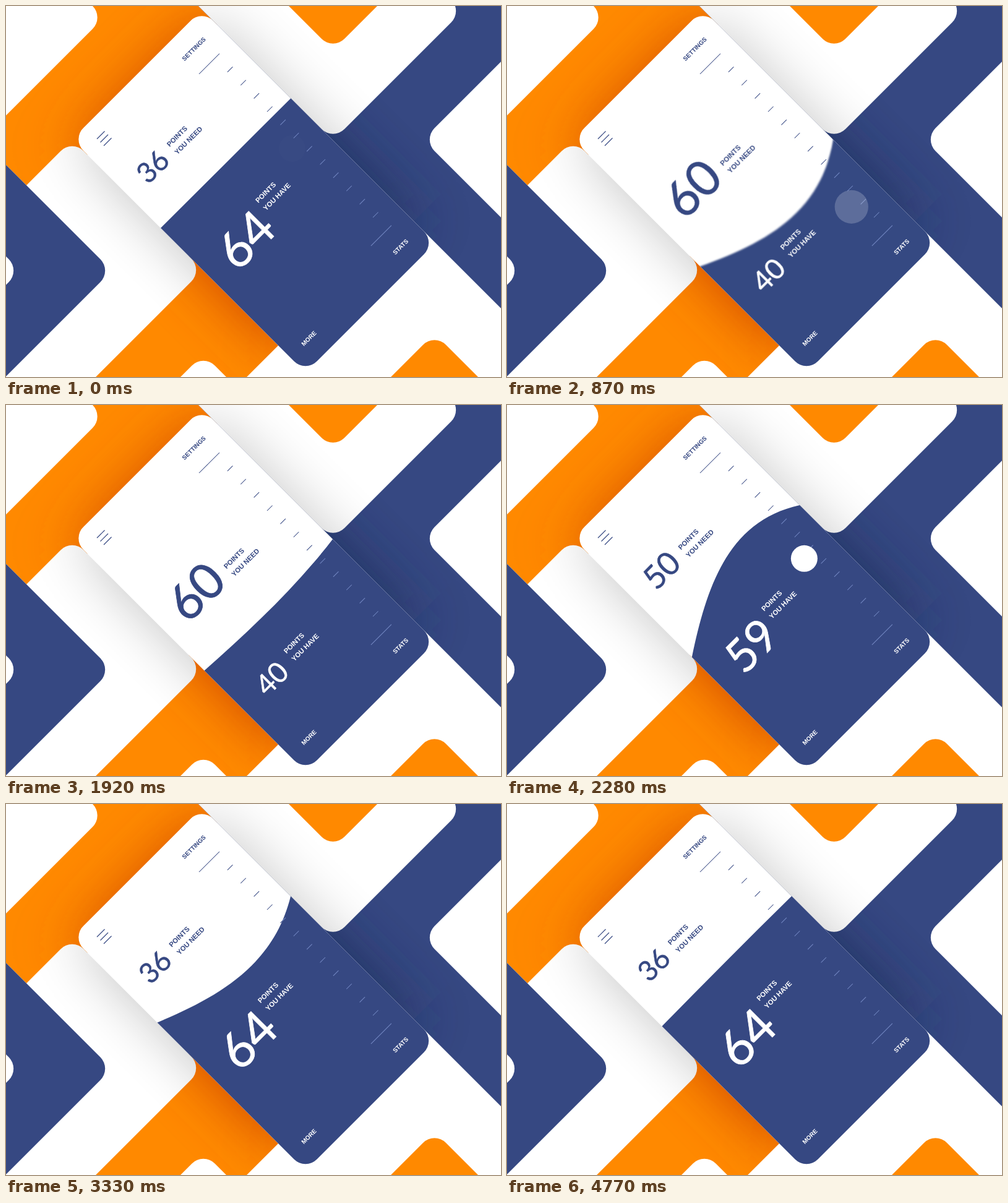
Write an HTML page that moves like this. It is 800 by 600 pixels and loops after 4800 ms.

```html
<!DOCTYPE html>
<html lang="en">
<head>
<meta charset="utf-8">
<title>Points</title>
<style>
  html, body { margin: 0; width: 100%; height: 100%; overflow: hidden; background: #fff; }
  svg { display: block; width: 800px; height: 600px; }
  text { font: 700 15.8px "Liberation Sans", Arial, sans-serif; }
  .small { font-size: 14px; }
  .num { font-family: Lato, sans-serif; font-weight: 400; stroke-width: .01em; }
  .dark { fill: #364882; }
  .light { fill: #fff; }
  .num.dark { stroke: #364882; }
  .num.light { stroke: #fff; }
</style>
</head>
<body>
<svg id="stage" viewBox="0 0 800 600"></svg>
<script>
const LOOP = 4800;
const NAVY = '#364882', ORANGE = '#ff8900', WHITE = '#fff';
const RADIUS = 37, FAR = 1900;
const LEFT = -109, RIGHT = 311, TOP = 322, BOTTOM = 1077;

// Tilted axes: p = x - y runs along the text, q = x + y runs down the card.
const TILT = 'matrix(.5 -.5 .5 .5 0 0)';

const rect = (p0, q0, p1, q1, r, attrs = '') =>
  `<rect x="${p0}" y="${q0}" width="${p1 - p0}" height="${q1 - q0}" rx="${r}" ${attrs}/>`;

// A background tile; with a shade it also catches the shadow of the card.
let clips = 0;
function tile(p0, q0, p1, q1, fill, r = RADIUS, shade = '', alpha = 1) {
  const base = rect(p0, q0, p1, q1, r, `fill="${fill}"`);
  if (!shade) return base;
  const id = 'tile' + clips++;
  const shadow = rect(LEFT, TOP + 20, RIGHT, BOTTOM - 70, 0,
    `fill="${shade}" opacity="${alpha}" filter="url(#soft)"`);
  return `${base}<clipPath id="${id}">${rect(p0, q0, p1, q1, r)}</clipPath>
    <g clip-path="url(#${id})">${shadow}</g>`;
}

function ticks(color) {
  let d = '';
  for (let i = 0; i < 14; i++) d += `M${i % 13 ? 251 : 202} ${422 + 42.75 * i}H268`;
  return `<path d="${d}" stroke="${color}" stroke-width="1.4" fill="none"/>`;
}

const counter = (id, tone, word) => `<g id="${id}">
  <text class="num ${tone}"></text>
  <text class="${tone}">POINTS</text>
  <text class="${tone}">${word}</text></g>`;

const blurFilter = (id, spread) =>
  `<filter id="${id}" filterUnits="userSpaceOnUse" x="-900" y="-400" width="2200" height="2000">
    <feGaussianBlur stdDeviation="${spread}"/></filter>`;

const stage = document.getElementById('stage');
stage.innerHTML = `
  <defs>
    ${blurFilter('soft', 66)}${blurFilter('smear', 0)}${blurFilter('smudge', 0)}
    <clipPath id="card">${rect(LEFT, TOP, RIGHT, BOTTOM, RADIUS)}</clipPath>
    <clipPath id="low"><path class="wave"/></clipPath>
  </defs>
  <g transform="${TILT}">
    ${tile(-257, -FAR, RIGHT, 372, ORANGE, 0, '#cc4400')}
    ${tile(-FAR, -FAR, 140, 177, WHITE)}
    ${tile(-FAR, 700, LEFT, 989, ORANGE, 0, '#cc4400')}
    ${tile(-FAR, 882, -244, FAR, WHITE)}
    ${tile(-FAR, 323, LEFT, 745, WHITE, RADIUS, '#000', .24)}
    ${tile(-FAR, -FAR, -257, 599, NAVY)}
    ${tile(-FAR, -FAR, -405, 451, WHITE)}
    ${tile(RIGHT, -FAR, FAR, FAR, NAVY, 0, '#1f2a56', .8)}
    ${tile(RIGHT, -FAR, 730, 746, WHITE, RADIUS, '#000', .22)}
    ${tile(457, -FAR, FAR, 600, ORANGE)}
    ${tile(458, 890, FAR, FAR, WHITE)}
    ${tile(-FAR, 1222, 163, FAR, ORANGE)}
    <g clip-path="url(#card)">
      ${rect(LEFT, TOP, RIGHT, BOTTOM, 0, `fill="${WHITE}"`)}
      ${ticks(NAVY)}
      <path d="M-68 362h25m-25 11h25m-25 11h25" stroke="${NAVY}" stroke-width="1.7"/>
      <text class="small dark" x="269" y="378" text-anchor="end">SETTINGS</text>
      <path class="wave" id="pool" fill="${NAVY}"/>
      <g clip-path="url(#low)">${ticks('#7489c4')}</g>
      <text class="small light" x="-69" y="1032">MORE</text>
      <text class="small light" x="270" y="1032" text-anchor="end">STATS</text>
      ${counter('need', 'dark', 'YOU NEED')}
      ${counter('have', 'light', 'YOU HAVE')}
      <circle id="touch" cx="232" fill="${WHITE}"/>
    </g>
  </g>`;

const pick = id => document.getElementById(id);
const waves = stage.querySelectorAll('.wave');
const pool = pick('pool'), touch = pick('touch');
const need = pick('need'), have = pick('have');

const { PI, exp, sin, cos, abs, min, max } = Math;
const mix = (a, b, k) => a + (b - a) * k;
const clamp = x => min(1, max(0, x));

// One drag goes down, a second one goes back up; s is the time since a press.
const SECOND = 1950, RELEASE = 787;
const pulse = x => x * exp(1 - x);
const swing = (s, period, life) => {
  const d = max(0, s - RELEASE);
  return sin(2 * PI * d / period) * life(d);
};

const settle = s => 1 - exp(-s / 200);
const count = s => clamp(s / 780);
const lag = s => {
  const w = PI / 1420, life = 560;
  return 1 - exp(-s / life) * (cos(w * s) + sin(w * s) / (w * life));
};
const bounce = s => -20 * swing(s, 480, d => exp(-d / 700));
const bulge = s => 127 * pulse(s / 420) ** 4 + 125 * swing(s, 333, d => pulse(d / 300));

// The second drag answers with the same motion, mirrored.
const both = (f, t) => f(t) - f(max(0, t - SECOND));

function place(el, x, y) {
  el.setAttribute('x', x.toFixed(2));
  el.setAttribute('y', y.toFixed(2));
}

function setCounter(group, value, size, numX, numY, labelX, labelY) {
  const [num, first, second] = group.children;
  num.textContent = Math.round(value);
  num.style.fontSize = size.toFixed(2) + 'px';
  place(num, numX, numY);
  place(first, labelX, labelY);
  place(second, labelX, labelY + 25);
}

function setBlur(el, name, amount) {
  if (amount > .1) {
    pick(name).firstElementChild.setAttribute('stdDeviation', `0 ${amount.toFixed(2)}`);
    el.setAttribute('filter', `url(#${name})`);
  } else {
    el.removeAttribute('filter');
  }
}

function draw(t) {
  const k = both(settle, t);
  const s = t < SECOND ? t : t - SECOND;

  const a = 609 + 136 * both(lag, t), b = 609 + 136 * k, bend = both(bulge, t);
  const c1 = mix(a, b, 1 / 3) + bend * .6;
  const c2 = mix(a, b, 2 / 3) + bend;
  const d = `M-300 1300V${a}H${LEFT}C31 ${c1} 171 ${c2} ${RIGHT} ${b}H500V1300Z`;
  waves.forEach(w => w.setAttribute('d', d));

  const base = 609 + 133 * k + both(bounce, t);
  setCounter(need, mix(36, 60, both(count, t)), mix(64, 113, k),
    -60, base - 90, mix(36, 91, k), base - 117);
  setCounter(have, mix(64, 40, k), mix(114, 65, k),
    mix(-56, -50, k), base + mix(196, 156, k), mix(89, 51, k), base + 117);

  const blur = 8 * clamp(1 - abs(s - 810) / 80);
  setBlur(pool, 'smear', blur);
  setBlur(need, 'smudge', blur / 5);
  setBlur(have, 'smudge', blur / 5);

  // Each press fades in, drags, then swells and fades out.
  const out = clamp((s - 710) / 200);
  touch.setAttribute('cy', 692 + 192 * k);
  touch.setAttribute('r', (21.5 + 7 * out) * Math.SQRT2);
  touch.setAttribute('opacity', clamp(s / 100) * (1 - out));
}

const start = performance.now();
function tick() {
  draw((performance.now() - start) % LOOP);
  requestAnimationFrame(tick);
}
tick();
</script>
</body>
</html>
```
